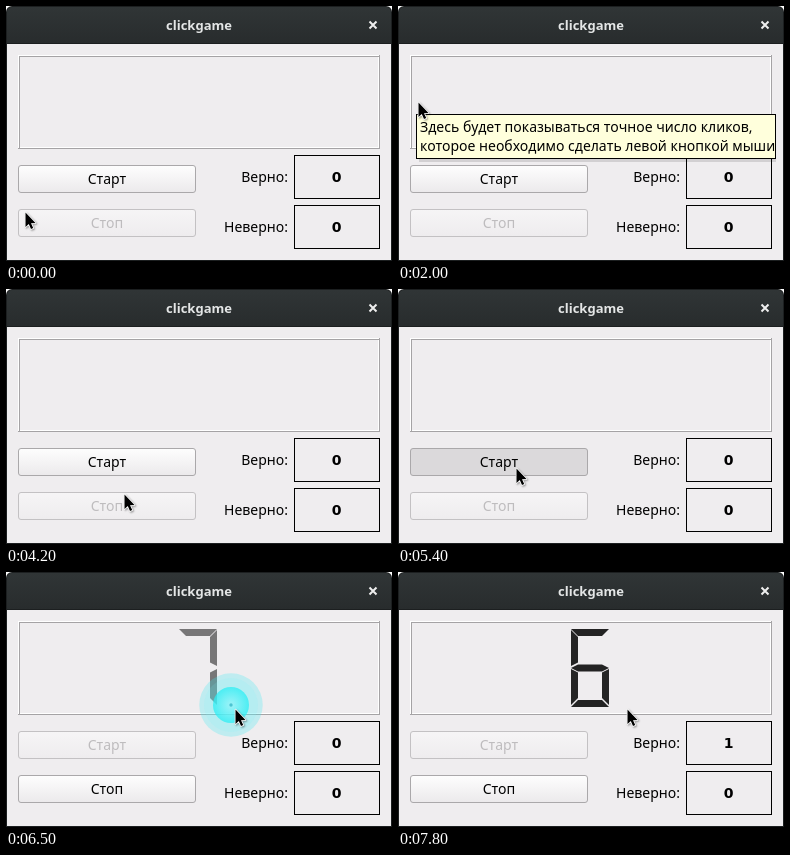
An HTML page with a canvas for the animation above (8 s loop, 386x255 px).

```html
<!DOCTYPE html>
<html lang="ru">
<head>
<meta charset="utf-8">
<title>clickgame</title>
<style>
html, body { margin: 0; width: 100%; height: 100%; overflow: hidden; background: #fff; }
canvas { display: block; }
</style>
</head>
<body>
<canvas id="stage" width="386" height="255"></canvas>
<script>
const ctx = document.getElementById('stage').getContext('2d');
const LOOP = 8000, STEP = 100;
const FONT = '14px "Noto Sans", sans-serif';
const START = 5500, FADE = 2000;

// Pointer stops: time, x, y
const pointerPath = [
  [0, 19, 206], [600, 19, 206], [800, 26, 150], [900, 20, 123], [1000, 20, 123],
  [1200, 20, 96], [3300, 20, 96], [3400, 31, 102], [3500, 31, 102], [4000, 118, 213],
  [4100, 118, 213], [4500, 118, 179], [5500, 118, 179], [6200, 229, 137], [LOOP, 229, 137]
];

// Seven-segment geometry: segment length and thickness
const L = 39, W = 7, H = 3.5;
const segments = [
  [[0, 0], [L - 1, 0], [L - W - 1, W], [W, W]],
  [[0, 1], [W, W + 1], [W, L - H - 2], [0, L - 2]],
  [[L - 1, 1], [L - 1, L - 2], [L - W - 1, L - H - 2], [L - W - 1, W + 1]],
  [[0, L], [W, L - H], [L - W - 1, L - H], [L - 1, L], [L - W - 1, L + H], [W, L + H]],
  [[0, L + 1], [W, L + H + 1], [W, 2 * L - W - 2], [0, 2 * L - 2]],
  [[L - 1, L + 1], [L - 1, 2 * L - 2], [L - W - 1, 2 * L - W - 2], [L - W - 1, L + H + 1]],
  [[0, 2 * L], [W, 2 * L - W], [L - W - 1, 2 * L - W], [L - 1, 2 * L]]
];
const digitSegments = { 7: [0, 2, 5], 6: [0, 1, 3, 4, 5, 6] };

function rect(x, y, w, h, color) {
  ctx.fillStyle = color;
  ctx.fillRect(x, y, w, h);
}

function outline(x, y, w, h, color) {
  ctx.strokeStyle = color;
  ctx.lineWidth = 1;
  ctx.strokeRect(x + .5, y + .5, w - 1, h - 1);
}

function text(str, x, y, align = 'left', color = '#000', font = FONT) {
  ctx.font = font;
  ctx.textAlign = align;
  ctx.fillStyle = color;
  ctx.fillText(str, x, y);
}

function polygon(points, x, y) {
  ctx.beginPath();
  for (const [px, py] of points) ctx.lineTo(x + px, y + py);
  ctx.closePath();
}

function vertical(y0, y1, top, bottom) {
  const g = ctx.createLinearGradient(0, y0, 0, y1);
  g.addColorStop(0, top);
  g.addColorStop(1, bottom);
  return g;
}

function drawWindow() {
  rect(0, 0, 386, 255, '#fff');
  ctx.beginPath();
  ctx.roundRect(0, 0, 386, 255, [6, 6, 0, 0]);
  ctx.fillStyle = '#1c1f20';
  ctx.fill();
  ctx.beginPath();
  ctx.roundRect(1, 1, 384, 36, [5, 5, 0, 0]);
  ctx.fillStyle = vertical(1, 37, '#303536', '#282c2d');
  ctx.fill();
  rect(1, 38, 384, 216, '#efedef');
  text('clickgame', 193, 24, 'center', '#e4e6e6', 'bold 13px "Noto Sans", sans-serif');
  ctx.strokeStyle = '#eee';
  ctx.lineWidth = 2;
  ctx.beginPath();
  ctx.moveTo(363.5, 15.5);
  ctx.lineTo(370.5, 22.5);
  ctx.moveTo(370.5, 15.5);
  ctx.lineTo(363.5, 22.5);
  ctx.stroke();
}

function drawDisplay() {
  const dark = '#a5a3a5';
  outline(12, 49, 362, 94, '#fff');
  rect(12, 142, 362, 1, dark);
  rect(373, 49, 1, 94, dark);
  rect(13, 50, 360, 1, dark);
  rect(13, 50, 1, 92, dark);
  rect(14, 141, 359, 1, '#fff');
  rect(372, 51, 1, 91, '#fff');
}

function drawButton(label, y, enabled, pressed) {
  ctx.beginPath();
  ctx.roundRect(12.5, y + .5, 177, 27, 2.5);
  ctx.fillStyle = pressed ? '#dbd9db'
    : enabled ? vertical(y, y + 28, '#fefefe', '#ebe9eb')
    : vertical(y, y + 28, '#f6f5f6', '#eeecee');
  ctx.fill();
  ctx.strokeStyle = enabled ? '#aaa8aa' : '#c3c1c3';
  ctx.lineWidth = 1;
  ctx.stroke();
  text(label, 101, y + 19, 'center', enabled ? '#000' : '#bebcbe');
}

function drawCounter(label, value, y) {
  text(label, 282, y + 27, 'right');
  outline(288, y, 86, 44, '#000');
  text(value, 330.5, y + 27, 'center', '#000', 'bold 14px "DejaVu Sans", sans-serif');
}

function drawDigit(digit, alpha) {
  ctx.globalAlpha = alpha;
  ctx.fillStyle = '#000';
  for (const i of digitSegments[digit]) {
    polygon(segments[i], 173, 57);
    ctx.fill();
  }
  ctx.globalAlpha = 1;
}

function drawTooltip() {
  rect(21, 153, 357, 3, 'rgba(0,0,0,.12)');
  rect(18, 108, 360, 45, '#ffffdc');
  outline(18, 108, 360, 45, '#000');
  text('Здесь будет показываться точное число кликов,', 22, 126);
  text('которое необходимо сделать левой кнопкой мыши', 22, 145);
}

function disc(r, fill) {
  ctx.beginPath();
  ctx.arc(225, 133, r, 0, 2 * Math.PI);
  ctx.fillStyle = fill;
  ctx.fill();
}

function drawRipple(t) {
  const pulse = -Math.cos(Math.PI * (t - 6500) / 100);
  const inner = 21 + 3 * pulse;
  const glow = ctx.createRadialGradient(225, 133, 0, 225, 133, inner);
  glow.addColorStop(0, 'rgba(150,245,250,.75)');
  glow.addColorStop(1, 'rgba(40,238,244,.75)');
  disc(32.5 + pulse * .8, 'rgba(60,232,240,.27)');
  disc(27, 'rgba(120,240,245,.15)');
  disc(inner, glow);
  disc(1.7, '#4cc4d2');
}

function drawPointer(t) {
  const i = pointerPath.findIndex(p => p[0] > t);
  const [t0, x0, y0] = pointerPath[i - 1], [t1, x1, y1] = pointerPath[i];
  const k = (t - t0) / (t1 - t0);
  ctx.save();
  ctx.shadowColor = 'rgba(0,0,0,.4)';
  ctx.shadowBlur = 2;
  ctx.shadowOffsetX = ctx.shadowOffsetY = 1;
  polygon([[.5, .5], [.5, 15], [3.8, 12], [6, 17], [8.2, 16], [6, 11.2], [10.5, 11]],
    Math.round(x0 + (x1 - x0) * k), Math.round(y0 + (y1 - y0) * k));
  ctx.lineJoin = 'round';
  ctx.lineWidth = 1.6;
  ctx.strokeStyle = '#fff';
  ctx.stroke();
  ctx.restore();
  ctx.fillStyle = '#000';
  ctx.fill();
}

function render(now) {
  const t = Math.floor(now % LOOP / STEP) * STEP;
  const playing = t >= START, scored = t >= START + FADE;
  drawWindow();
  drawDisplay();
  drawButton('Старт', 159, !playing, t === START - STEP);
  drawButton('Стоп', 203, playing, false);
  drawCounter('Верно:', scored ? '1' : '0', 149);
  drawCounter('Неверно:', '0', 199);
  if (playing) drawDigit(scored ? 6 : 7, 1 - (t - START) % FADE / FADE);
  if (t >= 2000 && t < 3700) drawTooltip();
  if (t >= 6300 && t < 7400) drawRipple(t);
  drawPointer(t);
}

const began = performance.now();
function tick() {
  render(performance.now() - began);
  requestAnimationFrame(tick);
}
tick();
</script>
</body>
</html>
```
